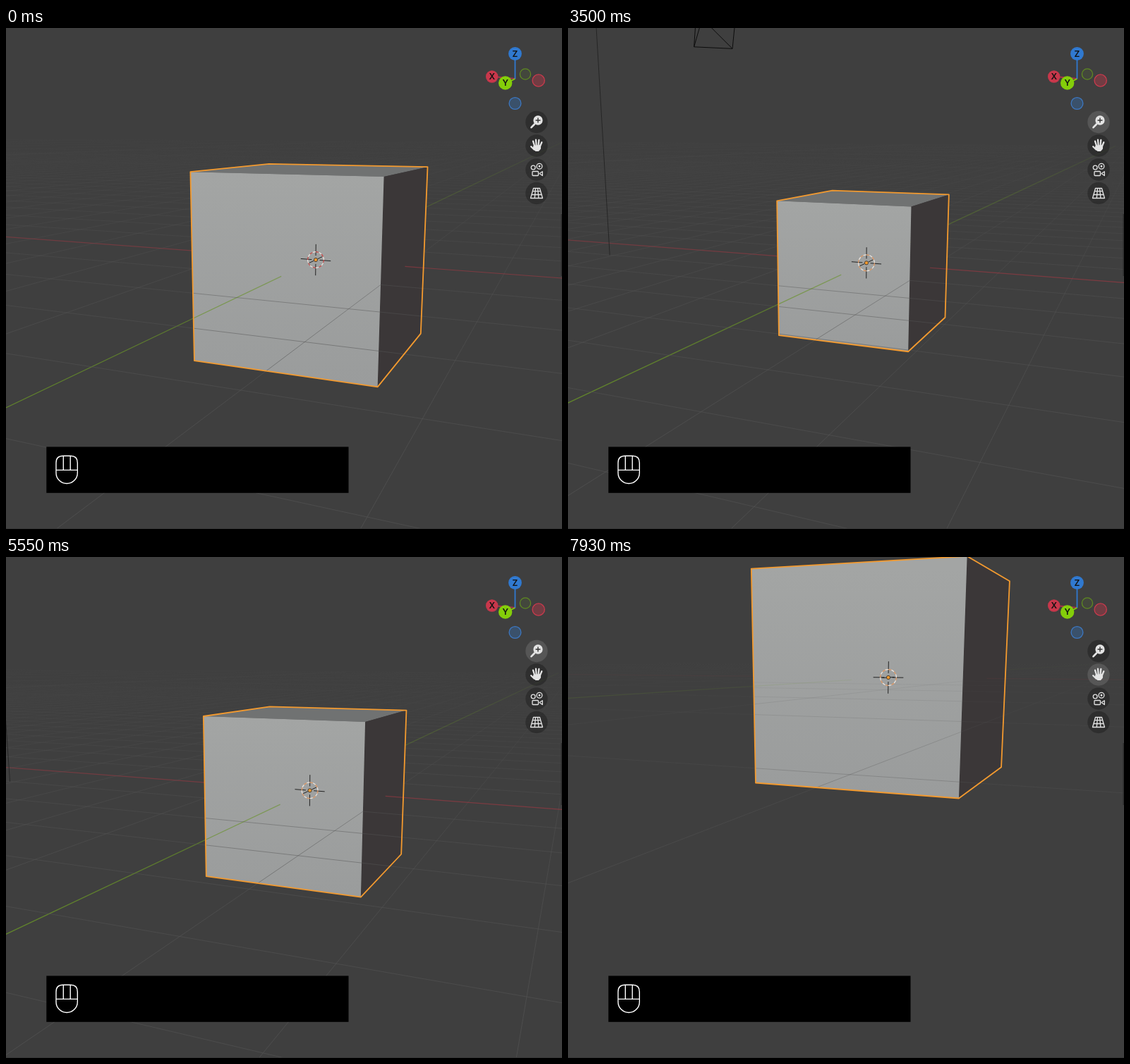
Write an HTML page with a canvas that moves like this. It is 788x711 px and loops after 8 s.

```html
<!DOCTYPE html>
<html lang="en">
<head>
<meta charset="utf-8">
<title>Viewport navigation</title>
<style>
  html, body { margin: 0; width: 100%; height: 100%; overflow: hidden; background: #3f3f3f; }
  canvas, svg { position: absolute; left: 0; top: 0; width: 788px; height: 711px; }
  .letter { font: 600 12px Inter, "Open Sans", sans-serif; text-anchor: middle; fill: #111; }
  .button { fill: rgba(18, 18, 18, .36); }
  .button.on { fill: rgba(118, 118, 118, .42); }
  .icon { fill: none; stroke: #e4e4e4; stroke-width: 1.3; stroke-linecap: round; stroke-linejoin: round; }
  .solid { fill: #e4e4e4; }
</style>
</head>
<body>
<canvas id="scene" width="788" height="711"></canvas>
<svg viewBox="0 0 788 711">
  <path d="M787.3 264V352" stroke="#2c2c2c" stroke-width="1.4"/>
  <path d="M0 710.5H788" stroke="#363636"/>

  <circle id="halo" cx="721.5" cy="72" r="44.5" fill="#fff" fill-opacity=".14"/>
  <g fill="none" stroke-width="1.3">
    <circle cx="721.5" cy="107" r="8.4" fill="#3079d0" fill-opacity=".3" stroke="#3d78c2"/>
    <circle cx="736" cy="65.5" r="7.6" fill="#84ce0a" fill-opacity=".06" stroke="#5f8a22"/>
    <circle cx="754.7" cy="74.5" r="8.6" fill="#c63649" fill-opacity=".38" stroke="#cc3a4d"/>
    <g stroke-width="1.8">
      <path d="M721.5 72L696 69.5" stroke="#a8364a"/>
      <path d="M721.5 72L714 76" stroke="#84ce0a"/>
      <path d="M721.5 72V44" stroke="#3079d0"/>
    </g>
  </g>
  <circle cx="688.7" cy="69" r="8.7" fill="#c8374b"/>
  <circle cx="707.7" cy="78" r="9.7" fill="#84ce0a"/>
  <circle cx="721.5" cy="36.5" r="9.4" fill="#3079d0"/>
  <g class="letter">
    <text x="688.7" y="73.2">X</text>
    <text x="707.7" y="82.4">Y</text>
    <text x="721.5" y="40.8">Z</text>
  </g>

  <circle class="button" cx="752" cy="133.5" r="15.7"/>
  <circle class="button" cx="752" cy="167" r="15.7"/>
  <circle class="button" cx="752" cy="201" r="15.7"/>
  <circle class="button" cx="752" cy="234.5" r="15.7"/>

  <g class="icon">
    <path d="M749 136.5L744.5 141.2" stroke-width="2.6"/>
    <circle class="solid" cx="754" cy="131" r="6"/>
    <path d="M751 131H757M754 128V134" stroke="#333" stroke-width="1.4"/>

    <path class="solid" d="M748.3 167L757.6 166.5 757.5 171.5 755 174.5H750.3L747.5 171.5Z" stroke-width="1"/>
    <path d="M749 167L747 160.7M751.6 166L751 158.6M754.6 166L755.3 159M757 167.5L759.3 162.3M748.5 172.5L744.2 168.3" stroke-width="2.3"/>

    <circle cx="747.2" cy="198" r="2.9"/>
    <circle cx="756" cy="196.3" r="3.9"/>
    <circle cx="756" cy="196.3" r=".8"/>
    <rect x="746" y="203.5" width="8.5" height="6" rx="1"/>
    <path d="M756 206.5L760.3 203.8V209.5Z"/>

    <path d="M747.5 227.5H756.5L760.5 241.5H743.5ZM746.4 231.7H757.7M745 236.5H759.2M750.5 227.5L749.3 241.5M753.6 227.5L754.9 241.5"/>
  </g>

  <rect x="57.3" y="594.4" width="428.2" height="65.4"/>
  <g fill="none" stroke="#fff" stroke-width="1.4">
    <path d="M71 617Q71 607.3 81 607.3H91.5Q101.3 607.3 101.3 617V631.5A15.15 15 0 0 1 71 631.5Z"/>
    <path d="M71 627.4H101.3M81.3 607.3V627.4M91.2 607.3V627.4"/>
  </g>
  <path id="pointer" d="M0 0V14L3.2 11.2 5.6 16.2 7.8 15.2 5.5 10.3H10Z" fill="#fff" stroke="#111" stroke-width=".9"/>
</svg>
<script>
const LOOP = 8000, WIDTH = 788, HEIGHT = 711;
const ctx = document.getElementById('scene').getContext('2d');
const halo = document.getElementById('halo');
const pointer = document.getElementById('pointer');
const buttons = [...document.querySelectorAll('.button')];

// Each row: time, values...
const ZOOM = [[0, 7.92], [3000, 7.92], [3500, 10.9], [3820, 11.4], [3900, 11.4], [4490, 3.7],
  [4640, 3.45], [5300, 10.2], [5550, 9.25], [5810, 7.25], [LOOP, 7.25]];
const PAN = [[0, 0, 0], [6290, 0, 0], [6680, -119.4, -2.6], [7050, -45, 16], [7370, 18, 5],
  [7930, 9.6, -156.6], [LOOP, 9.6, -156.6]];
const POINTER = [[60, 718, 619], [500, 742, 320], [860, 754, 124], [1190, 747, 245], [1420, 750, 150],
  [1660, 721, 82], [1960, 720, 74], [2280, 774, 256], [2580, 748, 124], [2710, 752, 124],
  [5880, 752, 126], [6020, 752, 130], [6220, 751, 165]];

// Monotone cubic interpolation
function sample(keys, t) {
  const last = keys.length - 1;
  let i = keys.findIndex((key, n) => n < last && t < keys[n + 1][0]);
  if (i < 0) return keys[last].slice(1);
  const [t0, t1] = [keys[i][0], keys[i + 1][0]];
  const s = Math.max(0, (t - t0) / (t1 - t0)), span = t1 - t0;
  return keys[i].slice(1).map((from, c) => {
    const to = keys[i + 1][c + 1];
    const slope = n => n < 0 || n >= last ? 0
      : (keys[n + 1][c + 1] - keys[n][c + 1]) / (keys[n + 1][0] - keys[n][0]);
    const tangent = n => {
      const a = slope(n - 1), b = slope(n);
      return a * b > 0 ? 2 * a * b / (a + b) : 0;
    };
    const s2 = s * s, s3 = s2 * s, w = 3 * s2 - 2 * s3;
    return from + (to - from) * w
      + span * ((s3 - 2 * s2 + s) * tangent(i) + (s3 - s2) * tangent(i + 1));
  });
}

// Fixed camera orientation; zoom and pan only move the camera.
const FOCAL = 1010, CX = 374, CY = 340;
const yaw = 23.4 * Math.PI / 180, pitch = 10.8 * Math.PI / 180;
const RIGHT = [-Math.cos(yaw), -Math.sin(yaw), 0];
const UP = [Math.sin(yaw) * Math.sin(pitch), -Math.cos(yaw) * Math.sin(pitch), Math.cos(pitch)];
const BACK = [-Math.sin(yaw) * Math.cos(pitch), Math.cos(yaw) * Math.cos(pitch), Math.sin(pitch)];
const HORIZON = CY - FOCAL * Math.tan(pitch);
const dot = (a, b) => a[0] * b[0] + a[1] * b[1] + a[2] * b[2];
const mix = (a, b, s) => a.map((v, i) => v + (b[i] - v) * s);

let dist, ox, oy;
const depth = p => dist - dot(p, BACK);
const offset = p => [
  (ox - CX) * dot(p, BACK) + FOCAL * dot(p, RIGHT),
  (oy - CY) * dot(p, BACK) - FOCAL * dot(p, UP)
];
function project(p) {
  const [dx, dy] = offset(p), d = depth(p);
  return [ox + dx / d, oy + dy / d];
}

function path(points, close) {
  ctx.beginPath();
  points.forEach(p => ctx.lineTo(...p));
  if (close) ctx.closePath();
}

function line3(a, b) {
  const near = .08, da = depth(a), db = depth(b);
  if (da < near && db < near) return;
  if (da < near) a = mix(a, b, (near - da) / (db - da));
  if (db < near) b = mix(b, a, (near - db) / (da - db));
  path([project(a), project(b)]);
  ctx.stroke();
}

// Floor lines fade out towards the horizon.
function fading(rgb) {
  const gradient = ctx.createLinearGradient(0, HORIZON, 0, HEIGHT);
  for (let i = 0; i <= 12; i++) {
    const grazing = 1 - i / 12 * (HEIGHT - HORIZON) / FOCAL;
    gradient.addColorStop(i / 12, `rgba(${rgb},${1 - grazing ** 4})`);
  }
  return gradient;
}
const GRID = fading('84,84,84'), RED = fading('165,55,66'), GREEN = fading('103,145,39');
const FAR = 100, NEAR = 30;

// frontOnly keeps the parts of the floor that lie before the cube.
function floor(frontOnly) {
  for (let k = -FAR; k <= NEAR; k++) {
    const fade = k % 10 ? Math.max(0, 1 - Math.abs(k) / 45) * .72 : .8;
    if (!fade) continue;
    ctx.globalAlpha = k ? fade : 1;
    ctx.lineWidth = k ? 1 : 1.2;
    ctx.strokeStyle = k ? GRID : RED;
    line3([-FAR, k, 0], [frontOnly && k <= 1 ? -1 : FAR, k, 0]);
    for (const x of k ? [k, -k] : [0]) {
      if (Math.abs(x) > NEAR && k > 0) continue;
      ctx.strokeStyle = x ? GRID : GREEN;
      line3([x, frontOnly && x >= -1 ? 1 : -FAR, 0], [x, NEAR, 0]);
      if (k > -NEAR) break;
    }
  }
  ctx.globalAlpha = 1;
}

function hull(points) {
  const sorted = [...points].sort((a, b) => a[0] - b[0] || a[1] - b[1]);
  const half = list => {
    const out = [];
    for (const p of list) {
      while (out.length > 1) {
        const [a, b] = out.slice(-2);
        if ((b[0] - a[0]) * (p[1] - a[1]) - (b[1] - a[1]) * (p[0] - a[0]) > 0) break;
        out.pop();
      }
      out.push(p);
    }
    return out.slice(0, -1);
  };
  return [...half(sorted), ...half(sorted.reverse())];
}

const CORNERS = [];
for (const x of [-1, 1]) for (const y of [-1, 1]) for (const z of [-1, 1]) CORNERS.push([x, y, z]);

function face(points, fill) {
  path(points.map(project), true);
  ctx.fillStyle = fill;
  ctx.fill();
}

function cube() {
  const outline = hull(CORNERS.map(project));
  const topLeft = project([1, 1, 1]), bottom = project([-1, 1, -1]);
  const shade = ctx.createLinearGradient(0, topLeft[1], 0, bottom[1]);
  shade.addColorStop(0, '#a3a5a4');
  shade.addColorStop(1, '#9a9c9c');
  const eyeHeight = dist * Math.sin(pitch) + (oy - CY) * dist / FOCAL * Math.cos(pitch);
  if (eyeHeight > 1) face([[1, 1, 1], [-1, 1, 1], [-1, -1, 1], [1, -1, 1]], '#707272');
  face([[-1, 1, 1], [-1, -1, 1], [-1, -1, -1], [-1, 1, -1]], '#3b3738');
  face([[1, 1, 1], [-1, 1, 1], [-1, 1, -1], [1, 1, -1]], shade);

  ctx.save();
  path(outline, true);
  ctx.clip();
  floor(true);
  ctx.restore();

  path(outline, true);
  ctx.strokeStyle = '#f39a2f';
  ctx.lineWidth = 1.8;
  ctx.lineJoin = 'round';
  ctx.stroke();
}

// Lamp drop line and camera frustum
const LAMP = [4.076, 1.005, 5.904], CAMERA = [7.359, -6.926, 4.958];
const CAM_X = [.686, .7277, 0], CAM_Y = [-.324, .3054, .8954], CAM_Z = [.6516, -.6142, .4452];
const FRAME = [[-.5, -.281], [.5, -.281], [.5, .281], [-.5, .281]].map(([x, y]) =>
  CAMERA.map((c, i) => c + x * CAM_X[i] + y * CAM_Y[i] - 1.389 * CAM_Z[i]));

function wires() {
  ctx.lineWidth = 1;
  ctx.strokeStyle = '#262626';
  line3(LAMP, [LAMP[0], LAMP[1], 0]);
  ctx.strokeStyle = '#0c0c0c';
  FRAME.forEach((corner, i) => {
    line3(corner, FRAME[(i + 1) % 4]);
    line3(corner, CAMERA);
  });
}

function cursor3d(dragged) {
  ctx.lineWidth = 1;
  ctx.strokeStyle = '#222';
  [[1, 0, 0], [0, 1, 0], [0, 0, 1]].forEach((axis, i) => {
    const [dx, dy] = offset(axis).map(v => v / FOCAL);
    const length = i === 1 ? 27 : 22.5, gap = i === 1 ? 8 : 6;
    for (const s of [-1, 1]) {
      path([gap, length].map(r => [ox + s * r * dx, oy + s * r * dy]));
      ctx.stroke();
    }
  });
  for (let i = 0; i < 16; i++) {
    ctx.beginPath();
    ctx.arc(ox, oy, 11.4, i * Math.PI / 8, (i + 1) * Math.PI / 8);
    ctx.strokeStyle = i % 2 ? '#ece6e0' : dragged ? '#e39a64' : '#c94a48';
    ctx.lineWidth = 1.2;
    ctx.stroke();
  }
  ctx.beginPath();
  ctx.arc(ox, oy, 2.6, 0, 2 * Math.PI);
  ctx.fillStyle = '#f39a2f';
  ctx.fill();
  ctx.strokeStyle = '#2a2a2a';
  ctx.lineWidth = .8;
  ctx.stroke();
}

function controls(t) {
  const [x, y] = sample(POINTER, t);
  const visible = t >= 60 && t < 3020 || t >= 5880 && t < 6290;
  pointer.setAttribute('transform', `translate(${x} ${y})`);
  pointer.style.display = visible ? '' : 'none';
  halo.style.display = visible && Math.hypot(x - 721.5, y - 72) < 44 ? '' : 'none';
  buttons.forEach((button, i) => {
    const over = visible && Math.hypot(x - 752, y - 133.5 - 33.7 * i) < 11.5;
    const held = i === 0 && t >= 3020 && t < 5880 || i === 1 && t >= 6290;
    button.classList.toggle('on', over || held);
  });
}

function render(t) {
  [dist] = sample(ZOOM, t);
  const [panX, panY] = sample(PAN, t);
  ox = 380.4 + 464 / dist + panX;
  oy = 344.8 - 125 / dist + panY;
  ctx.fillStyle = '#3f3f3f';
  ctx.fillRect(0, 0, WIDTH, HEIGHT);
  floor(false);
  wires();
  cube();
  cursor3d(t >= 3020);
  controls(t);
}

const start = performance.now();
function tick() {
  render((performance.now() - start) % LOOP);
  requestAnimationFrame(tick);
}
tick();
</script>
</body>
</html>
```
